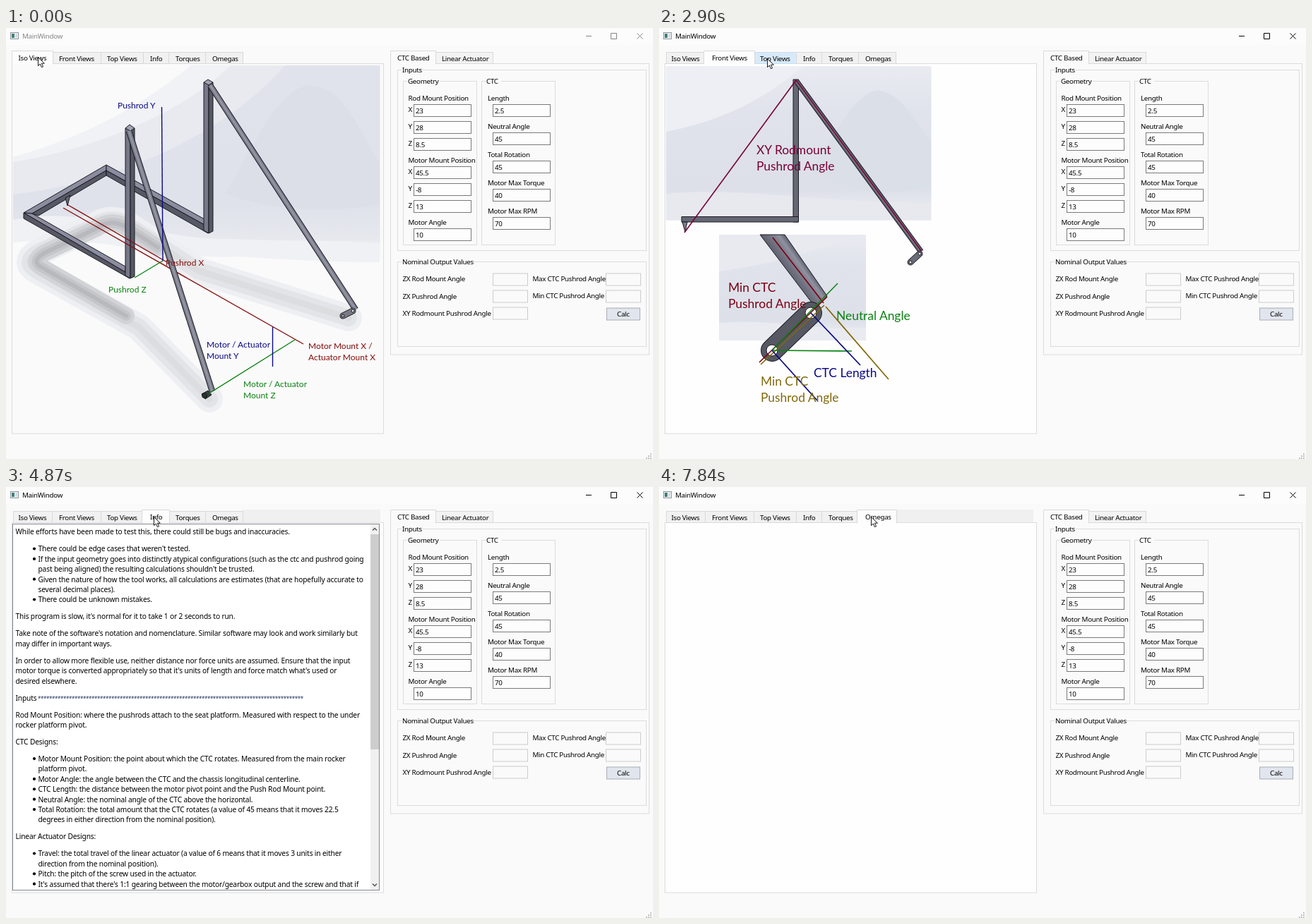
Recreate the animation shown at these times as an HTML page. Size 916x611 px, loop 8 s.

```html
<!DOCTYPE html>
<html lang="en">
<head>
<meta charset="utf-8">
<title>MainWindow</title>
<style>
html, body { margin: 0; width: 100%; height: 100%; overflow: hidden; background: #fafafa; }
svg { display: block; width: 916px; height: 611px; }
text { font: 9.8px "Noto Sans", "Open Sans", sans-serif; letter-spacing: -.3px; white-space: pre; }
.info text { font-size: 10.2px; letter-spacing: -.15px; }
.info .stars { font-size: 8px; fill: #27365c; letter-spacing: -.41px; }
text.note { font: 12px Lato, sans-serif; letter-spacing: 0; }
text.big { font: 17.4px Lato, sans-serif; letter-spacing: 0; }
</style>
</head>
<body>
<svg id="stage" viewBox="0 0 916 611" xmlns="http://www.w3.org/2000/svg"></svg>
<script>
const RED = '#850c0c', BLUE = '#0a0a82', GREEN = '#0a8212', GOLD = '#80690a', WINE = '#780038';
const EDGE = '#191a20', TOP = '#8b8d9f', SIDE = '#565865';

const text = (x, y, s, fill = '#000', cls = '') =>
  `<text x="${x}" y="${y}" fill="${fill}" class="${cls}">${s}</text>`;
const box = (x, y, w, h, fill = 'none', stroke = 'none') =>
  `<rect x="${x}" y="${y}" width="${w}" height="${h}" fill="${fill}" stroke="${stroke}"/>`;
const path = (d, fill = 'none', stroke = 'none', w = 1, extra = '') =>
  `<path d="${d}" fill="${fill}" stroke="${stroke}" stroke-width="${w}" ${extra}/>`;
const line = (x1, y1, x2, y2, stroke, w = 1.4) => path(`M${x1},${y1}L${x2},${y2}`, 'none', stroke, w);
const face = (points, fill) => path(`M${points}Z`, fill, EDGE, 1, 'stroke-linejoin="round"');
const dot = (x, y, r, fill, stroke = 'none') =>
  `<circle cx="${x}" cy="${y}" r="${r}" fill="${fill}" stroke="${stroke}"/>`;
const group = (id, body) => `<g id="${id}">${body}</g>`;
const rod = (x1, y1, x2, y2, w, fill = '#7c7e8d') =>
  line(x1, y1, x2, y2, EDGE, w) + line(x1, y1, x2, y2, fill, w - 2) + line(x1, y1, x2, y2, '#9698a6', w / 4);
const ROUND = 'stroke-linecap="round" stroke-linejoin="round"';
const halo = (d, c, w) => path(d, 'none', c, w, ROUND);
const link = (x1, y1, x2, y2, w, fill) => {
  const d = `M${x1},${y1}L${x2},${y2}`;
  return halo(d, EDGE, w) + halo(d, fill, w - 1.8);
};
const gradient = (id, dir, stops) => `<linearGradient id="${id}" ${dir}>` +
  stops.map(([at, c]) => `<stop offset="${at}" stop-color="${c}"/>`).join('') + '</linearGradient>';
const DOWN = 'x1="0" y1="0" x2="0" y2="1"', ACROSS = 'x1="0" y1="0" x2="1" y2="1"';

const defs = '<defs>' +
  gradient('sky', DOWN, [[0, '#e0e3eb'], [.7, '#dfe2ea'], [.86, '#e6e8ee'], [.93, '#f0f1f5'], [1, '#fbfbfb']]) +
  gradient('wall', DOWN, [[0, '#e9ebf1'], [.3, '#e0e3eb'], [.8, '#dde0e9'], [.93, '#e8eaf0'], [1, '#e9ebf0']]) +
  gradient('floor', ACROSS, [[0, '#ebecf0'], [.5, '#dfe1e8'], [1, '#d9dce5']]) +
  gradient('ground', ACROSS, [[0, '#c3c5ca'], [.45, '#cfd1d6'], [.75, '#d5d7dd'], [1, '#e0e2ea']]) +
  gradient('steel', 'gradientUnits="userSpaceOnUse" x1="265" y1="352" x2="243" y2="432"',
    [[0, '#5a5c6a'], [.18, '#6b6d7c'], [.45, '#86889a'], [.7, '#8b8d9f'], [1, '#6c6e7d']]) +
  gradient('tube', 'gradientUnits="userSpaceOnUse" x1="178" y1="350" x2="206" y2="330"',
    [[0, '#545662'], [.45, '#747685'], [.75, '#8f91a0'], [1, '#555763']]) +
  '<clipPath id="isoClip"><rect x="10" y="53" width="519.5" height="493"/></clipPath>' +
  '<clipPath id="topClip"><rect x="10" y="53" width="339" height="225"/></clipPath>' +
  '<clipPath id="zoomClip"><rect x="78" y="272" width="404" height="270"/></clipPath>' +
  '<clipPath id="infoClip"><rect x="10" y="53" width="506" height="518"/></clipPath></defs>';

function isoView() {
  const loop = 'M288,526L188,424L48,346Q20,332 48,317L125,281Q148,265 172,279L272,344L485,411';
  const core = 'M170,408L52,340Q34,331 54,319L128,284Q148,270 168,281L215,311';
  const scene = box(10, 53, 520, 284, 'url(#sky)') +
    path('M10,53H395C330,130 190,215 10,236Z', '#e8eaf0') +
    path('M10,53H318C250,120 130,170 10,190Z', '#f1f2f6') +
    path('M10,53H262C190,112 110,155 10,183Z', '#fafafa') +
    path('M310,235C340,190 380,90 425,82C480,75 505,160 529,190V250C460,262 380,260 310,235Z', '#dcdfe8') +
    path('M10,272C120,250 210,300 310,299C400,303 470,300 529,305V338H10Z', '#f0f1f5') +
    path('M10,304C130,290 220,330 330,324C420,330 480,332 529,332V345H10Z', '#fafafa') +
    halo(loop, '#eeeff2', 38) + halo(loop, '#e3e4e7', 24) + halo(loop, '#dcdddf', 9) +
    halo(core, '#d2d3d6', 24) + halo(core, '#c5c6ca', 14) + halo(core, '#b8b9be', 6);
  const frame =
    face('25,262 142,194 142,202 37,263', TOP) + face('37,263 142,202 142,209 46,266', SIDE) +
    face('142,194 281,271 281,279 142,202', TOP) + face('142,202 281,279 286,291 142,209', SIDE) +
    face('280,77 287,80 287,291 280,287', '#767889') + face('287,80 293,77 293,288 287,291', SIDE) +
    face('280,77 286,73 293,77 287,81', '#a0a2b0') +
    face('84,241 91,237 87,252', '#62646f') +
    face('25,262 37,263 169,338 169,346', TOP) + face('25,262 169,346 175,355 25,270', SIDE) +
    rod(289, 81, 495, 399, 8.5) +
    face('169,142 176,145 176,355 169,351', '#767889') + face('176,145 182,142 182,352 176,355', SIDE) +
    face('169,142 175,137 182,142 176,146', '#a0a2b0');
  const red = line(88, 251, 228, 332, RED) + line(81, 255, 421, 448, RED);
  const parts = rod(174, 146, 292, 515, 8.5) +
    link(491, 401, 477, 408, 9, '#777986') + dot(491, 401, 2, '#eee', EDGE) + dot(477, 408, 2, '#bbb', EDGE) +
    face('277,519 286,514 291,520 282,526', '#34423b') + dot(281, 521, 3.5, '#26352d', EDGE);
  const axes = line(182, 354, 222, 330, GREEN) + line(289, 517, 409, 442, GREEN) +
    line(220.5, 112, 222, 330, BLUE) + line(377.5, 424, 377.5, 480, BLUE);
  const note = (x, y, s, c) => text(x, y, s, c, 'note');
  const notes = note(158, 114, 'Pushrod Y', BLUE) + note(226, 337, 'Pushrod X', RED) +
    note(145, 375, 'Pushrod Z', GREEN) +
    note(284, 453, 'Motor / Actuator', BLUE) + note(284, 469, 'Mount Y', BLUE) +
    note(428, 455, 'Motor Mount X /', RED) + note(428, 471, 'Actuator Mount X', RED) +
    note(336, 509, 'Motor / Actuator', GREEN) + note(336, 525, 'Mount Z', GREEN);
  return `<g clip-path="url(#isoClip)">${scene}</g>` + frame + red + parts + axes + notes;
}

const big = (x, y, rows, c) => rows.map((s, i) => text(x, y + 23 * i, s, c, 'big')).join('');

function frontView() {
  const whole = box(10, 54, 375.5, 218.5, 'url(#wall)') +
    path('M10,54H205C150,100 90,132 10,147Z', '#edeff4') +
    path('M215,200C240,170 275,90 310,88C350,95 365,140 385,160V225C330,240 260,235 215,200Z', '#dbdfe8') +
    path('M10,235C120,225 250,250 385,247V272.5H10Z', '#e7e9ef') +
    face('190,73 197.5,73 197.5,275 190,275', '#656774') + face('32,267.5 197.5,267.5 197.5,275 32,275', '#656774') +
    face('33,275 40,275 37,289', '#7a7c88') +
    rod(195, 76, 371, 317, 8, '#5f616d') + link(369, 320, 356, 332, 9, '#6a6c78') +
    dot(369, 320, 2, '#fff', EDGE) + dot(356, 332, 2, '#fff', EDGE) +
    line(36, 290, 194, 74, WINE, 1.6) + line(194, 74, 371, 316, WINE, 1.6);
  const zoom = box(85, 293, 208, 150, 'url(#wall)') +
    path('M85,345C170,335 230,310 293,293H85Z', '#e8eaf0') +
    path('M85,418C170,412 220,430 293,425V443H85Z', '#e9ebf1') +
    path('M143,293H178L238,380L222,397Z', 'url(#tube)', EDGE) +
    link(215, 404, 160, 457, 32, '#565863') +
    dot(215, 404, 8, '#fff', EDGE) + dot(160, 457, 8, '#fff', EDGE) +
    line(161, 297, 233, 390, '#7c0012', 1.7) + line(142, 474, 238, 381, '#7c0012', 1.7) +
    line(144, 477, 234, 393, GOLD, 1.7) + line(236, 395, 325, 498, GOLD, 1.7) +
    line(160, 457, 253, 362, GREEN, 1.5) + line(160, 457, 273, 458, GREEN, 1.7) +
    line(215, 404, 285, 478, BLUE, 1.7) + line(160, 457, 224, 528, BLUE, 1.7);
  return whole + zoom + big(138, 179, ['XY Rodmount', 'Pushrod Angle'], WINE) +
    big(98, 374, ['Min CTC', 'Pushrod Angle'], '#7c0012') + big(251, 414, ['Neutral Angle'], GREEN) +
    big(219, 495, ['CTC Length'], BLUE) + big(144, 507, ['Min CTC', 'Pushrod Angle'], GOLD);
}

function topView() {
  const plan = 'M325,65L167,109H28V218H167L325,261';
  const shade = [[36, '#dcdee5'], [27, '#d2d4db'], [19, '#c6c8cf'], [12, '#b6b8c0']]
    .map(([w, c]) => halo(plan, c, w)).join('');
  const whole = `<g clip-path="url(#topClip)">${box(10, 53, 339, 225, 'url(#floor)')}${shade}</g>` +
    face('24,106.5 170,106.5 170,113 31,113 31,214.5 170,214.5 170,221 24,221', '#8b8d9c') +
    box(163.5, 106.5, 6.5, 6.5, '#a0a2b0', EDGE) + box(163.5, 214.5, 6.5, 6.5, '#a0a2b0', EDGE) +
    [[109, 65], [218, 261]].map(([a, b]) => rod(170, a, 325, b, 6.5, '#6f717e') + line(170, a, 325, b, WINE, 1.8)).join('') +
    path('M165,111L28,163L165,216', 'none', GOLD, 1.8);
  const rings = path('M78,272H300C380,300 440,350 452,430C440,500 330,520 240,500L78,470Z', '#c8cacf') +
    path('M78,284L380,358C425,368 440,400 440,440L410,488C330,495 250,475 78,425Z', '#bdbfc5');
  const zoom = `<g clip-path="url(#zoomClip)">${box(78, 272, 404, 270, 'url(#ground)')}${rings}` +
    path('M70,301L416,391C432,396 440,412 439,427C438,449 423,468 401,468L70,381Z', 'url(#steel)', EDGE, 1.2) + '</g>' +
    face('136,399 413,475 410,485 133,409', '#858797') +
    line(150, 403, 148, 413, EDGE, 1) + line(327, 452, 325, 461, EDGE, 1) + line(165, 409, 400, 470, EDGE, 2.2) +
    line(158, 408, 498, 410.5, GREEN, 1.7) + line(160, 410, 501, 499, GREEN, 1.7);
  return whole + zoom + big(91, 159, ['ZX Rodmount', 'Angle'], GOLD) +
    big(239, 161, ['ZX Pushrod', 'Angle'], WINE) + big(383, 448, ['Motor Angle'], GREEN);
}

// Blank lines split paragraphs, "- " starts a bullet, "  " continues one.
const INFO = `While efforts have been made to test this, there could still be bugs and inaccuracies.

- There could be edge cases that weren't tested.
- If the input geometry goes into distinctly atypical configurations (such as the ctc and pushrod going
  past being aligned) the resulting calculations shouldn't be trusted.
- Given the nature of how the tool works, all calculations are estimates (that are hopefully accurate to
  several decimal places).
- There could be unknown mistakes.

This program is slow, it's normal for it to take 1 or 2 seconds to run.

Take note of the software's notation and nomenclature. Similar software may look and work similarly but
may differ in important ways.

In order to allow more flexible use, neither distance nor force units are assumed. Ensure that the input
motor torque is converted appropriately so that it's units of length and force match what's used or
desired elsewhere.

Inputs *

Rod Mount Position: where the pushrods attach to the seat platform. Measured with respect to the under
rocker platform pivot.

CTC Designs:

- Motor Mount Position: the point about which the CTC rotates. Measured from the main rocker
  platform pivot.
- Motor Angle: the angle between the CTC and the chassis longitudinal centerline.
- CTC Length: the distance between the motor pivot point and the Push Rod Mount point.
- Neutral Angle: the nominal angle of the CTC above the horizontal.
- Total Rotation: the total amount that the CTC rotates (a value of 45 means that it moves 22.5
  degrees in either direction from the nominal position).

Linear Actuator Designs:

- Travel: the total travel of the linear actuator (a value of 6 means that it moves 3 units in either
  direction from the nominal position).
- Pitch: the pitch of the screw used in the actuator.
- It's assumed that there's 1:1 gearing between the motor/gearbox output and the screw and that if`;

function infoView() {
  let y = 64, out = '';
  for (const row of INFO.split('\n')) {
    if (!row) { y += 9.6; continue; }
    const inset = /^(- |  )/.test(row);
    if (row[0] === '-') out += dot(40, y - .5, 2.1, '#000');
    const s = (inset ? row.slice(2) : row).replace('*', `<tspan x="45" class="stars">${'*'.repeat(94)}</tspan>`);
    out += text(inset ? 45.5 : 13.5, y + 3.3, s);
    y += 14.4;
  }
  const arrow = (y, d) => path(`M519,${y + d}l3,${-2 * d}l3,${2 * d}`, 'none', '#505050', 1.4);
  return box(9.5, 52.5, 519, 519, '#fff', '#828790') + `<g class="info" clip-path="url(#infoClip)">${out}</g>` +
    box(516, 53, 12, 518, '#f0f0f0') + box(516, 67, 12, 305, '#cdcdcd') + arrow(60, 1.5) + arrow(564, -1.5);
}

function field(x, cy, w, value) {
  return box(x + .5, cy - 8.5, w, 17, value ? '#fdfdfd' : '#fafafa', value ? '#7a7a7a' : '#cccccc') +
    (value ? text(x + 3, cy + 3.8, value) : '');
}
function frameBox(x, y, w, h, title, gap) {
  return box(x + .5, y + .5, w, h, 'none', '#dcdcdc') + box(x + 6, y - 1, gap, 3, '#fafafa') + text(x + 7, y + 3.7, title);
}

function rightSide() {
  let out = box(544.5, 50.5, 366, 412.5, '#fafafa', '#dcdcdc') +
    box(608.5, 34.5, 81, 16, '#f3f3f3', '#d9d9d9') + text(617, 46.5, 'Linear Actuator') +
    path('M544.5,51.5V32.5H608.5V51.5', '#fafafa', '#d9d9d9') + text(554, 45.7, 'CTC Based') +
    frameBox(554, 59, 352, 256, 'Inputs', 30) + frameBox(562, 75, 104, 232, 'Geometry', 46) +
    frameBox(673, 75, 104, 232, 'CTC', 22) + frameBox(554, 331, 352, 120, 'Nominal Output Values', 101);
  [['Rod Mount Position', 99, ['23', '28', '8.5']], ['Motor Mount Position', 187, ['45.5', '-8', '13']]]
    .forEach(([name, y, values]) => {
      out += text(569.5, y + 3.6, name);
      values.forEach((v, i) => {
        out += text(569.5, y + 20 + 24 * i, 'XYZ'[i]) + field(577, y + 18 + 24 * i, 81, v);
      });
    });
  out += text(569.5, 278.6, 'Motor Angle') + field(577, 293, 81, '10');
  [['Length', '2.5'], ['Neutral Angle', '45'], ['Total Rotation', '45'], ['Motor Max Torque', '40'], ['Motor Max RPM', '70']]
    .forEach(([name, v], i) => { out += text(682, 102.6 + 40 * i, name) + field(689, 117 + 40 * i, 81, v); });
  ['ZX Rod Mount Angle', 'ZX Pushrod Angle', 'XY Rodmount Pushrod Angle'].forEach((name, i) => {
    out += text(561.5, [358.6, 384.3, 408.3][i], name) + field(689, 356.5 + 24 * i, 49);
  });
  ['Max', 'Min'].forEach((name, i) => {
    out += text(745.5, 358.6 + 24 * i, name + ' CTC Pushrod Angle') + field(849, 356.5 + 24 * i, 49);
  });
  return out + box(850.5, 397, 47, 17, '#e1e5ed', '#a9adb5') + text(865, 409.3, 'Calc');
}

const tabs = [['Iso Views', 10, 65, 17.5], ['Front Views', 65, 134, 75], ['Top Views', 134, 194, 143],
  ['Info', 194, 230, 204], ['Torques', 230, 282, 240], ['Omegas', 282, 335, 292]];

function tabBar(active, hover) {
  const one = ([name, a, b, x], i) => i === active
    ? path(`M${a - 1.5},51.5V32.5H${b + 1.5}V51.5`, '#fdfdfd', '#d9d9d9') + text(x, 45.7, name)
    : box(a + .5, 34.5, b - a, 16, i === hover ? '#d8eaf9' : '#f1f1f1', i === hover ? '#c6dff2' : '#d9d9d9') + text(x, 46.5, name);
  const rest = tabs.map((t, i) => i === active ? '' : one(t, i)).join('');
  return (active > 2 ? box(335, 32, 195, 18, '#f0f0f0') : '') + rest + one(tabs[active], active);
}

function titleBar() {
  const icon = box(6.5, 6.5, 11, 9, '#f4f6f8', '#8b949c') + box(8, 8, 4, 6, '#3f7f78') + box(13, 8, 3, 6, '#d5dbe0');
  return box(0, 0, 916, 24, '#fcfcfc') + icon +
    '<g id="caption">' + text(23, 15.3, 'MainWindow', 'currentColor') +
    path('M821,11.5h8M856.5,7.5h8v8h-8zM893.5,7.5l8,8M901.5,7.5l-8,8', 'none', 'currentColor') + '</g>';
}

const grip = [[913, 604], [910, 607], [913, 607], [907, 610], [910, 610], [913, 610]]
  .map(([x, y]) => box(x - 1, y - 1, 1.7, 1.7, '#b0b0b0')).join('');
const pointer = path('M.5,.5V12.6L3.3,10L5.4,14.7L7.5,13.8L5.4,9.2H9.3Z', '#fff', '#000', .9);

const views = [isoView, frontView, topView, infoView];
const stage = document.getElementById('stage');
stage.innerHTML = defs + box(0, 0, 916, 611, '#fafafa') + titleBar() + rightSide() + grip +
  '<rect id="panel" x="8.5" y="50.5" width="526" height="524.5" stroke="#dcdcdc"/>' +
  group('tabs', '') + views.map((v, i) => group('view' + i, v())).join('') + group('pointer', pointer);

const clicks = [0, 2090, 3400, 4870, 6250, 7840];
const moves = [[0, 45, 41], [660, 50, 41], [785, 56, 41], [910, 59, 40], [1050, 76, 40], [1200, 79, 40],
  [1320, 82, 39], [1440, 84, 39], [1560, 85, 40], [1680, 86, 41], [2510, 100, 43], [2630, 128, 45], [2750, 147, 44],
  [2900, 153, 43], [3800, 169, 44], [3950, 212, 44], [4090, 211, 42], [4210, 206, 41], [4360, 209, 42],
  [5250, 215, 43], [5370, 226, 43], [5490, 236, 43], [5610, 243, 43], [5730, 246, 43],
  [6800, 268, 43], [6950, 288, 42], [7080, 300, 42]];

const el = id => document.getElementById(id);
let shown = '';

function draw(now) {
  const t = now % 8000;
  const active = clicks.filter(c => c <= t).length - 1;
  const [, x, y] = moves.filter(m => m[0] <= t).pop();
  const hover = tabs.findIndex(([, a, b]) => x >= a && x < b);
  const state = active + '/' + hover;
  if (state !== shown) {
    shown = state;
    el('tabs').innerHTML = tabBar(active, hover);
    views.forEach((v, i) => { el('view' + i).style.display = i === active ? '' : 'none'; });
    el('panel').setAttribute('fill', active ? '#fefefe' : '#fafafa');
    el('caption').style.color = active ? '#000' : '#858585';
  }
  el('pointer').setAttribute('transform', `translate(${x} ${y})`);
  requestAnimationFrame(() => draw(performance.now()));
}
draw(0);
</script>
</body>
</html>
```
